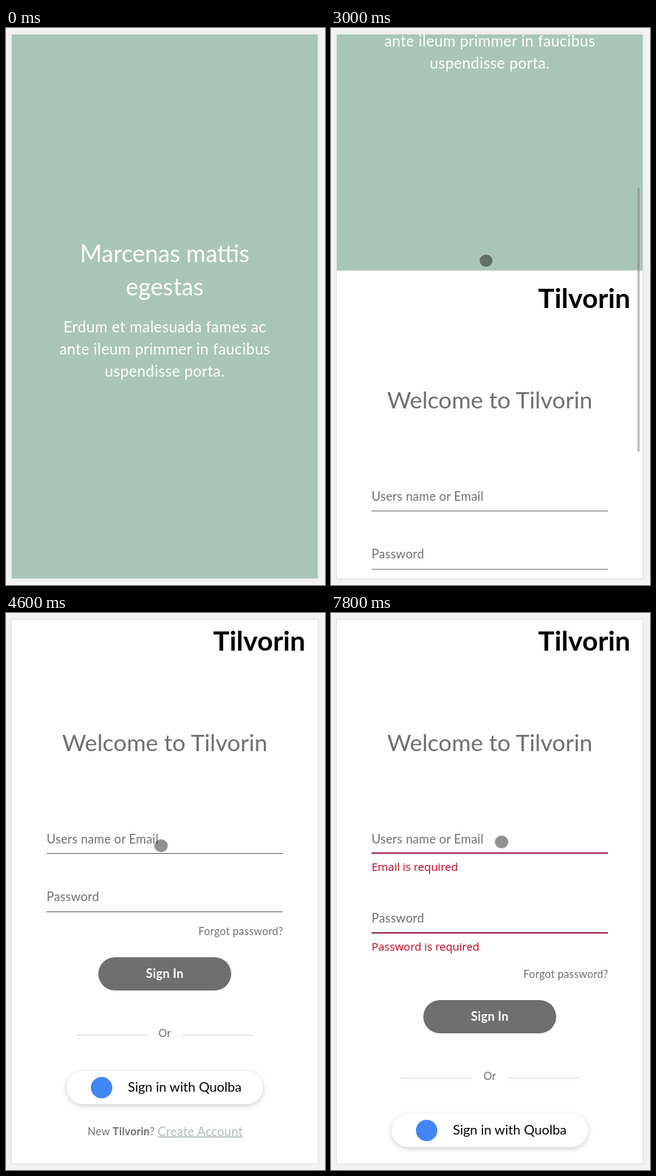
Write an HTML page that moves like this. It is 432 by 754 pixels and loops after 8 s.

```html
<!DOCTYPE html>
<html lang="en">
<head>
<meta charset="utf-8">
<title>Sign-in screen</title>
<style>
  html, body { margin: 0; width: 100%; height: 100%; overflow: hidden; background: #f4f4f4; }
  svg { display: block; width: 100%; height: 100%; }
  text { font-family: Lato, "Open Sans", sans-serif; fill: #6f6f6f; white-space: pre; }
  .mid { text-anchor: middle; }
  .end { text-anchor: end; }
  .head { font-size: 32px; }
  .welcome { font-size: 31.5px; }
  .intro { font-size: 20.5px; letter-spacing: .015em; }
  .light text { fill: #fff; }
  .brand { font-size: 37px; font-weight: 700; fill: #000; }
  .field, .link { font-size: 16.5px; letter-spacing: .015em; }
  .small { font-size: 14.4px; letter-spacing: .015em; }
  .button { font-size: 16.5px; font-weight: 700; letter-spacing: .015em; fill: #fff; }
  .sso { font-size: 18px; fill: #000; }
  .link { fill: #b2beb9; text-decoration: underline; }
  .error { font: 15px "Open Sans", "Noto Sans", sans-serif; fill: #c2001c; }
  .bold { font-weight: 700; }
  .panel { filter: drop-shadow(0 0 4px rgba(0, 0, 0, .06)); }
  .pill { filter: drop-shadow(0 2px 3px rgba(0, 0, 0, .2)); }
</style>
</head>
<body>
<svg viewBox="0 0 432 754">
  <clipPath id="screen"><rect x="8" y="9" width="414" height="736"/></clipPath>
  <rect width="432" height="754" fill="#f4f4f4"/>
  <rect class="panel" x="7.5" y="8.5" width="415" height="737" fill="#fefefe" stroke="#e2e4e3"/>

  <g clip-path="url(#screen)">
    <g id="page">
      <g class="light">
        <rect x="8" y="0" width="414" height="745" fill="#a9c5b8"/>
        <text class="head mid" x="215" y="317">Marcenas mattis</text>
        <text class="head mid" x="215" y="362">egestas</text>
        <text class="intro mid" x="215" y="412">Erdum et malesuada fames ac</text>
        <text class="intro mid" x="215" y="442">ante ileum primmer in faucibus</text>
        <text class="intro mid" x="215" y="472">uspendisse porta.</text>
      </g>

      <g transform="translate(0 745)">
        <text class="brand end" x="405.5" y="50.5">Tilvorin</text>
        <text class="welcome mid" x="215" y="187">Welcome to Tilvorin</text>

        <text id="emailLabel" class="field" x="55">Users name or Email</text>
        <line id="emailLine" x1="55" x2="375"/>
        <text id="emailError" class="error" x="55" y="349">Email is required</text>

        <g id="passwordBlock">
          <text id="passwordLabel" class="field" x="55">Password</text>
          <line id="passwordLine" x1="55" x2="375"/>
          <text id="passwordError" class="error" x="55" y="428">Password is required</text>
        </g>

        <g id="actions">
          <text class="small end" x="375.5" y="436">Forgot password?</text>
          <rect x="125" y="466" width="180" height="45" rx="22.5" fill="#6f6f6f"/>
          <text class="button mid" x="215" y="493.5">Sign In</text>
          <path d="M95 571.5H191M239 571.5H335" stroke="#d6d8d7"/>
          <text class="small mid" x="215" y="574">Or</text>
          <rect class="pill" x="82" y="620" width="266" height="45" rx="22.5" fill="#fff"/>
          <circle cx="129.5" cy="642.5" r="14.5" fill="#4285f4"/>
          <text class="sso" x="165" y="648">Sign in with Quolba</text>
          <text class="small" x="110.5" y="707">New <tspan class="bold">Tilvorin</tspan>?</text>
          <text class="link" x="205.5" y="707.5">Create Account</text>
        </g>
      </g>
    </g>
    <rect id="bar" x="415" width="3" height="358" rx="1.5" fill="#808080"/>
  </g>
  <ellipse id="pointer" rx="9.4" ry="8.9" fill="#000" fill-opacity=".43" stroke="#fff" stroke-opacity=".4" stroke-width="1.4"/>
</svg>
<script>
const LOOP = 8000;
const ERROR_HEIGHT = 29;
const EMAIL_FOCUS = 5200, PASSWORD_FOCUS = 5950, BLUR = 6700;

const scrollSteps = [[1780, 0], [2000, 54], [2400, 198], [3200, 489], [3800, 708], [3900, 745]];
const pointerSteps = [
  [4600, 210, 315], [5100, 186, 312], [5400, 186, 314], [5800, 202, 374], [6050, 205, 384],
  [6600, 400, 318], [7200, 388, 312], [7800, 231, 310]
];

const el = id => document.getElementById(id);
const set = (id, attrs) => {
  for (const name in attrs) el(id).setAttribute(name, attrs[name]);
};
const clamp = v => Math.max(0, Math.min(1, v));
const smooth = v => v * v * (3 - 2 * v);
const ramp = (t, start, length) => smooth(clamp((t - start) / length));

// Interpolates column `col` of a [time, value...] table.
function track(steps, t, col, ease = v => v) {
  if (t <= steps[0][0]) return steps[0][col];
  const i = steps.findIndex(step => step[0] > t);
  if (i < 0) return steps[steps.length - 1][col];
  const a = steps[i - 1], b = steps[i];
  return a[col] + (b[col] - a[col]) * ease((t - a[0]) / (b[0] - a[0]));
}

function drawField(name, restY, lineY, floated, invalid) {
  set(name + 'Label', { y: restY - 33.5 * floated });
  el(name + 'Label').style.fontSize = 16.5 - 2.1 * floated + 'px';
  const y = invalid ? lineY - .5 : lineY;
  set(name + 'Line', {
    y1: y, y2: y,
    stroke: invalid ? '#a62c50' : '#6a6a6a',
    'stroke-width': invalid ? 2 : 1
  });
  set(name + 'Error', { opacity: invalid ? 1 : 0 });
}

function draw(t) {
  const scroll = track(scrollSteps, t, 1);
  set('page', { transform: `translate(0 ${-scroll})` });
  set('bar', {
    y: 12.3 + scroll * .4885,
    opacity: .5 * clamp((t - 1780) / 80) * (1 - clamp((t - 4200) / 300))
  });

  const emailFloat = ramp(t, EMAIL_FOCUS, 150) - ramp(t, PASSWORD_FOCUS, 150);
  const passwordFloat = ramp(t, PASSWORD_FOCUS, 150) - ramp(t, BLUR, 150);
  const emailInvalid = t >= PASSWORD_FOCUS, passwordInvalid = t >= BLUR;
  drawField('email', 311.5, 325.5, emailFloat, emailInvalid);
  drawField('password', 390, 404.5, passwordFloat, passwordInvalid);

  const shift = emailInvalid ? ERROR_HEIGHT : 0;
  set('passwordBlock', { transform: `translate(0 ${shift})` });
  set('actions', { transform: `translate(0 ${shift + (passwordInvalid ? ERROR_HEIGHT : 0)})` });

  set('pointer', {
    cx: track(pointerSteps, t, 1, smooth),
    cy: track(pointerSteps, t, 2, smooth),
    opacity: clamp((t - 1650) / 100)
  });
}

const start = performance.now();
function tick() {
  draw((performance.now() - start) % LOOP);
  requestAnimationFrame(tick);
}
tick();
</script>
</body>
</html>
```
